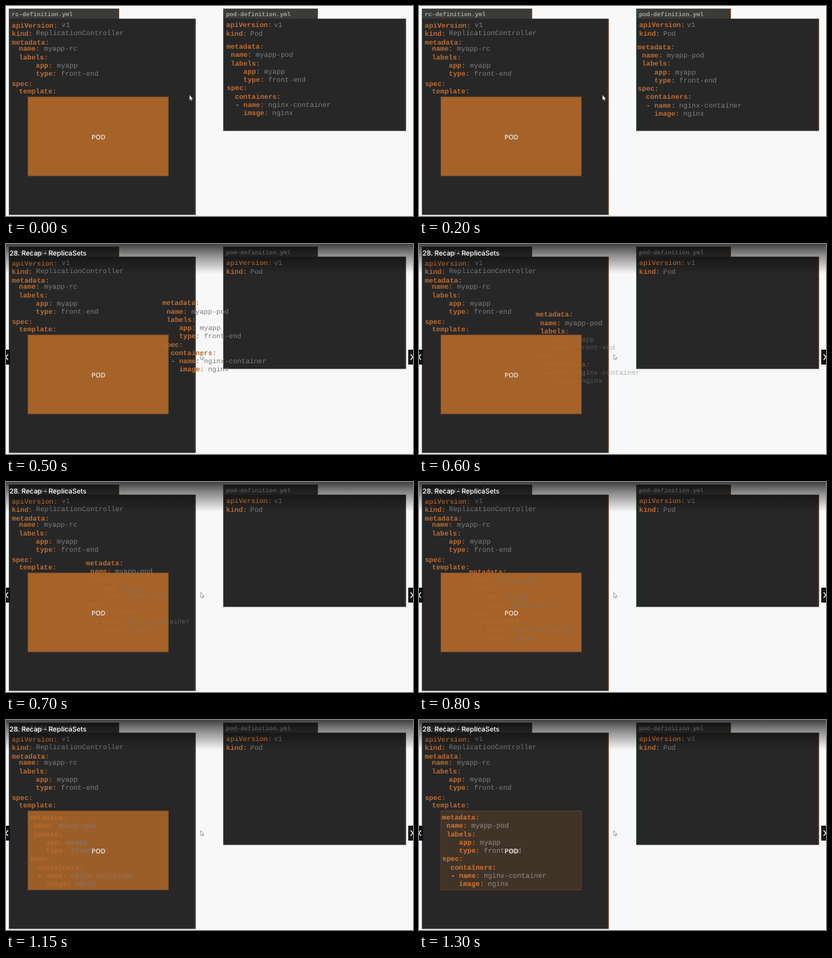
Animation, 600 px wide and 310 px high, one loop 1350 ms. Source, as an HTML page:

```html
<!DOCTYPE html>
<html lang="en">
<head>
<meta charset="utf-8">
<title>Pod template</title>
<style>
html, body { margin: 0; width: 100%; height: 100%; overflow: hidden; background: #f8f8f8; }
svg { display: block; width: 600px; height: 310px; }
text { white-space: pre; text-rendering: geometricPrecision; }
.code { font: 10.25px "Liberation Mono", "Courier New", monospace; }
.key { fill: #bd6c31; font-weight: bold; }
.val { fill: #7d7c80; }
.dash { fill: #c9bdb2; }
.tab { font: bold 8.8px "Liberation Mono", "Courier New", monospace; fill: #a6a6a3; }
.pod { font: 600 9.7px "Open Sans", sans-serif; fill: #f0e6de; }
.title { font: 500 10px Inter, sans-serif; fill: #fff; }
</style>
</head>
<body>
<svg viewBox="0 0 600 310">
  <defs>
    <linearGradient id="shade" x2="0" y2="1">
      <stop offset="0" stop-color="#000" stop-opacity=".74"/>
      <stop offset=".35" stop-color="#000" stop-opacity=".45"/>
      <stop offset="1" stop-color="#000" stop-opacity="0"/>
    </linearGradient>
    <clipPath id="inBox"><rect x="32" y="134" width="207.500" height="117"/></clipPath>
  </defs>
  <rect width="600" height="310" fill="#f8f8f8"/>
  <g id="panels"></g>
  <g id="under" class="code"></g>
  <rect id="box" x="32.3" y="134.2" width="206.900" height="116.600" fill="#a5632a" stroke="#8f5427" stroke-width=".8"/>
  <g clip-path="url(#inBox)"><g id="over" class="code"></g></g>
  <text class="pod" x="136.300" y="196.500" text-anchor="middle">POD</text>
  <g id="hud">
    <rect width="600" height="44" fill="url(#shade)"/>
    <text class="title" x="5" y="16.700">28. Recap - ReplicaSets</text>
    <path d="M0 156h6v22h-6zM593 156h7v22h-7z" fill="#111"/>
    <path d="M3 163l-3.5 4 3.5 4M596.500 163l3.500 4-3.500 4" fill="none" stroke="#fff" stroke-width="1.300"/>
  </g>
  <path id="cursor" d="M0 0v7.500l1.700-1.500 1.100 2.500 1.200-.6-1.100-2.300h2.200z" fill="#fff" stroke="#666" stroke-width=".6"/>
</svg>
<script>
const $ = id => document.getElementById(id);

function add(parent, tag, attrs, content = '') {
  const el = document.createElementNS('http://www.w3.org/2000/svg', tag);
  for (const k in attrs) el.setAttribute(k, attrs[k]);
  el.textContent = content;
  return parent.appendChild(el);
}

// A row is x, y of its middle, key, then value x, value and value lift.
function addRow(parent, [x, y, key, valX, val, lift = 0], dash) {
  const g = add(parent, 'g', {});
  if (dash) add(g, 'text', { class: 'dash', x: x - 12, y: y + 3 }, '-');
  add(g, 'text', { class: 'key', x, y: y + 3 }, key + ':');
  if (val) add(g, 'text', { class: 'val', x: valX, y: y + 3 - lift }, val);
  return g;
}

function addPanel(x, w, h, tabW, name, rows) {
  const g = add($('panels'), 'g', { class: 'code' });
  const right = x + w, bottom = 19 + h;
  add(g, 'rect', { x, y: 3.8, width: tabW, height: 16, fill: '#3b3c3a' });
  add(g, 'rect', { x, y: 18.7, width: w, height: h + .7, fill: '#272727' });
  add(g, 'path', { d: `M${x + .5} 4V${bottom}`, stroke: '#4d6a62' });
  add(g, 'path', { d: `M${x + tabW - .5} 4V19M${right - .5} 19V${bottom}`, stroke: '#93592f' });
  add(g, 'text', { class: 'tab', x: x + 4.5, y: 14.5 }, name);
  rows.forEach(r => addRow(g, r));
}

addPanel(4, 275.7, 289, 163, 'rc-definition.yml', [
  [8.5, 28.8, 'apiVersion', 82, 'v1', 1.2],
  [8.5, 41.3, 'kind', 44.3, 'ReplicationController', 1.5],
  [8.5, 53.6, 'metadata'],
  [19, 63, 'name', 56, 'myapp-rc'],
  [19, 75.5, 'labels'],
  [44, 87.5, 'app', 75, 'myapp'],
  [44, 99.5, 'type', 81, 'front-end'],
  [8.7, 114.5, 'spec'],
  [19.2, 125.8, 'template']
]);
addPanel(320, 269.8, 165, 140, 'pod-definition.yml', [
  [324.5, 28.2, 'apiVersion', 395, 'v1'],
  [324.5, 41, 'kind', 360, 'Pod']
]);

const podRows = [
  [0, 'metadata'], [6.5, 'name', 43, 'myapp-pod'], [6.5, 'labels'],
  [25, 'app', 55.5, 'myapp'], [25, 'type', 61.5, 'front-end'], [.5, 'spec'],
  [12.5, 'containers'], [25, 'name', 61.5, 'nginx-container'], [25, 'image', 67.5, 'nginx']
];
const [underRows] = ['under', 'over'].map(id =>
  podRows.map(([x, key, valX, val], i) =>
    addRow($(id), [x, i * 12.25, key, valX, val], i === 7)));

// Piecewise linear lookup in [time, value] steps.
function at(steps, t) {
  let i = 1;
  while (i < steps.length - 1 && steps[i][0] < t) i++;
  const [t0, a] = steps[i - 1], [t1, b] = steps[i];
  return a + (b - a) * Math.min(1, Math.max(0, (t - t0) / (t1 - t0)));
}

const LOOP = 1350, STEP = 50;
const slide = [[0, 0], [200, .01], [300, .058], [400, .155], [500, .326], [600, .526],
  [700, .712], [800, .863], [900, .95], [1000, .988], [1100, 1]];
const boxFade = [[1100, 1], [1150, .92], [1300, .2]];
const textFade = [[1100, .45], [1150, .6], [1300, .75]];
const hudFade = [[400, 0], [500, 1]];
const cursorX = [[200, 270.5], [400, 285], [500, 287]];
const cursorY = [[200, 131.5], [400, 147], [500, 163]];

function draw(now) {
  const t = Math.floor(now % LOOP / STEP) * STEP;
  const p = at(slide, t);
  const move = `translate(${325 - 291 * p} ${60 + 84.2 * p})`;
  $('under').setAttribute('transform', move);
  $('over').setAttribute('transform', move);
  $('over').setAttribute('opacity', at(textFade, t));
  const dim = t >= 550 && t < 1100 ? .55 : 1;
  underRows.forEach((g, i) => g.setAttribute('opacity', i > 2 ? dim : 1));

  const b = at(boxFade, t);
  $('box').setAttribute('fill-opacity', b);
  $('box').setAttribute('stroke-opacity', Math.min(1, b + .45));
  $('hud').setAttribute('opacity', at(hudFade, t));
  $('cursor').setAttribute('transform', `translate(${at(cursorX, t)} ${at(cursorY, t)})`);
  requestAnimationFrame(() => draw(performance.now() - start));
}
const start = performance.now();
draw(0);
</script>
</body>
</html>
```
